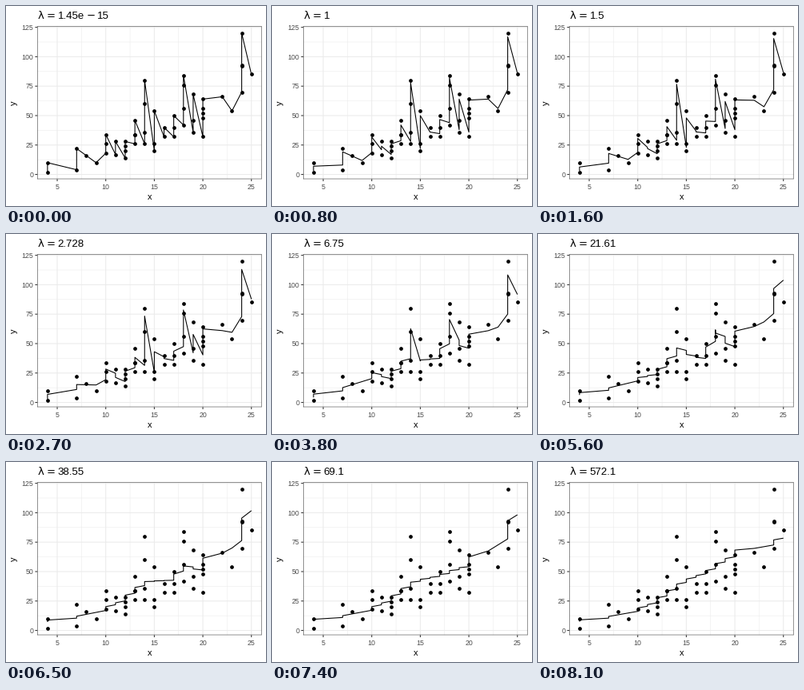
Animation, 325 px wide and 250 px high, one loop 8.2 s. Source, as a matplotlib script:

```python
"""Solution path of linear trend filtering on stopping distance against speed."""
import numpy as np
import matplotlib.pyplot as plt
from matplotlib.animation import FuncAnimation

WIDTH, HEIGHT, DPI = 325, 250, 100
FRAMES, INTERVAL = 82, 100
PT = 72 / DPI  # points per pixel
LEFT, RIGHT, TOP, BOTTOM = 39.15, 319.5, 25.3, 216.3
GRID, DARK, LABEL = "#EBEBEB", "#333333", "#4D4D4D"
LINE = 1.07

SPEED = np.repeat(
    [4, 7, 8, 9, 10, 11, 12, 13, 14, 15, 16, 17, 18, 19, 20, 22, 23, 24, 25],
    [2, 2, 1, 1, 3, 2, 4, 4, 4, 3, 2, 3, 4, 3, 5, 1, 1, 4, 1])
DIST = np.array([
    2, 10, 4, 22, 16, 10, 18, 26, 34, 17, 28, 14, 20, 24, 28, 26, 34, 34, 46,
    26, 36, 60, 80, 20, 26, 54, 32, 40, 32, 40, 50, 42, 56, 76, 84, 36, 46, 68,
    32, 48, 52, 56, 64, 66, 54, 70, 92, 93, 120, 85], float)

# Penalties at the numerical zero end of the path, where the fit equals the data.
TINY = [1.45e-15, 3.553e-15, 5.921e-15, 1.066e-14]
# Frame number -> penalty reached there.
PACE = {0: 0, 16: 1.5, 27: 2.728, 38: 6.75, 56: 21.61, 65: 38.55, 81: 572.1}


def solution_path(y, max_steps=300):
    """Dual path algorithm: penalties and fits at every knot, ascending."""
    diff = np.diff(np.eye(len(y)), 2, axis=0)
    sign = np.zeros(len(diff))
    lam, knots = np.inf, []
    while (sign == 0).any() and len(knots) < max_steps:
        free = sign == 0
        inner, bound, s = diff[free], diff[~free], sign[~free]
        pull = bound.T @ s
        rhs = np.column_stack([inner @ y, inner @ pull])
        a, b = np.linalg.solve(inner @ inner.T, rhs).T
        side = np.where(a < 0, -1, 1)
        base, slope = y - inner.T @ a, pull - inner.T @ b
        c, d = s * (bound @ base), s * (bound @ slope)

        times, sides = np.zeros(len(diff)), np.zeros(len(diff))
        times[free], sides[free] = a / (b + side), side
        leaving = (c < 0) & (d < 0)
        times[~free] = np.where(leaving, c / np.where(leaving, d, 1), 0)
        times[times > lam + 1e-7] = 0

        k = np.argmax(times)
        lam = min(lam, times[k])
        if lam < 1e-9:
            break
        sign[k] = sides[k]  # zero when a coordinate leaves the boundary
        knots.append((lam, base - lam * slope))
    return knots[::-1]


path = [(lam, DIST) for lam in TINY] + solution_path(DIST)
penalties = np.array([lam for lam, _ in path])
stops = [np.argmin(abs(penalties - lam)) for lam in PACE.values()]
order = np.interp(np.arange(FRAMES), list(PACE), stops).round().astype(int)


def px(x):
    return LEFT + (np.asarray(x) - 2.95) / 23.1 * (RIGHT - LEFT)


def py(y):
    return BOTTOM - (np.asarray(y) + 3.9) / 129.8 * (BOTTOM - TOP)


fig = plt.figure(figsize=(WIDTH / DPI, HEIGHT / DPI), dpi=DPI, facecolor="white")
ax = fig.add_axes([0, 0, 1, 1])
ax.set(xlim=(0, WIDTH), ylim=(HEIGHT, 0))
ax.axis("off")


def stroke(xs, ys, color, width, z):
    return ax.plot(xs, ys, color=color, lw=width * PT, zorder=z, snap=False,
                   solid_capstyle="butt", solid_joinstyle="round")[0]


def write(x, y, text, size, color="black", font="Liberation Sans", **kw):
    kw = {"ha": "left", "va": "baseline", **kw}
    return ax.text(x, y, text, fontsize=size * PT, color=color, family=font, **kw)


def draw_panel():
    for x in np.arange(5, 26, 2.5):
        major = x % 5 == 0
        stroke([px(x)] * 2, [TOP, BOTTOM], GRID, LINE if major else LINE / 2, 1 + major)
        if major:
            stroke([px(x)] * 2, [BOTTOM, BOTTOM + 2.75], DARK, LINE, 3)
            write(px(x), 229, f"{x:g}", 8.8, LABEL, ha="center")
    for y in np.arange(0, 126, 12.5):
        major = y % 25 == 0
        stroke([LEFT, RIGHT], [py(y)] * 2, GRID, LINE if major else LINE / 2, 1 + major)
        if major:
            stroke([LEFT - 2.75, LEFT], [py(y)] * 2, DARK, LINE, 3)
            write(LEFT - 4.95, py(y) + 3.1, f"{y:g}", 8.8, LABEL, ha="right")
    # Only the inner half of the border is visible.
    e = LINE / 4
    for x in (LEFT + e, RIGHT - e):
        stroke([x, x], [TOP, BOTTOM], DARK, LINE / 2, 6)
    for y in (TOP + e, BOTTOM - e):
        stroke([LEFT, RIGHT], [y, y], DARK, LINE / 2, 6)
    write((LEFT + RIGHT) / 2, 242, "x", 11, ha="center")
    write(13, (TOP + BOTTOM) / 2, "y", 11, ha="right", va="center", rotation=90,
          rotation_mode="default").set_x(15.2)


draw_panel()
fit_line = stroke(px(SPEED), py(DIST), "black", LINE, 4)
ax.plot(px(SPEED), py(DIST), "o", color="black", ms=3.91 * PT, mew=0.71 * PT,
        zorder=5, snap=False)

TITLE, BASE, NUMBER_X = 13.2, 16, 64.5
write(39.2, BASE, "λ", TITLE, font="DejaVu Sans")
write(50.2, BASE, "=", TITLE, font="DejaVu Sans")
number = write(NUMBER_X, BASE, "", TITLE)
minus = write(0, BASE, "", TITLE, font="DejaVu Sans")
exponent = write(0, BASE, "", TITLE)


def set_title(lam):
    mantissa, e, power = f"{lam:.4g}".partition("e-")
    text = mantissa + e[:1]
    end = NUMBER_X + TITLE * sum(0.278 if ch == "." else 0.556 for ch in text)
    number.set_text(text)
    minus.set_text("−" if e else "")
    minus.set_x(end + 2.9)
    exponent.set_text(power)
    exponent.set_x(end + 16.9)


def update(frame):
    lam, fit = path[order[frame]]
    fit_line.set_ydata(py(fit))
    set_title(lam)
    return fit_line, number, minus, exponent


animation = FuncAnimation(fig, update, frames=FRAMES, interval=INTERVAL,
                          init_func=lambda: update(0), repeat=True, repeat_delay=0)
plt.show()
```
